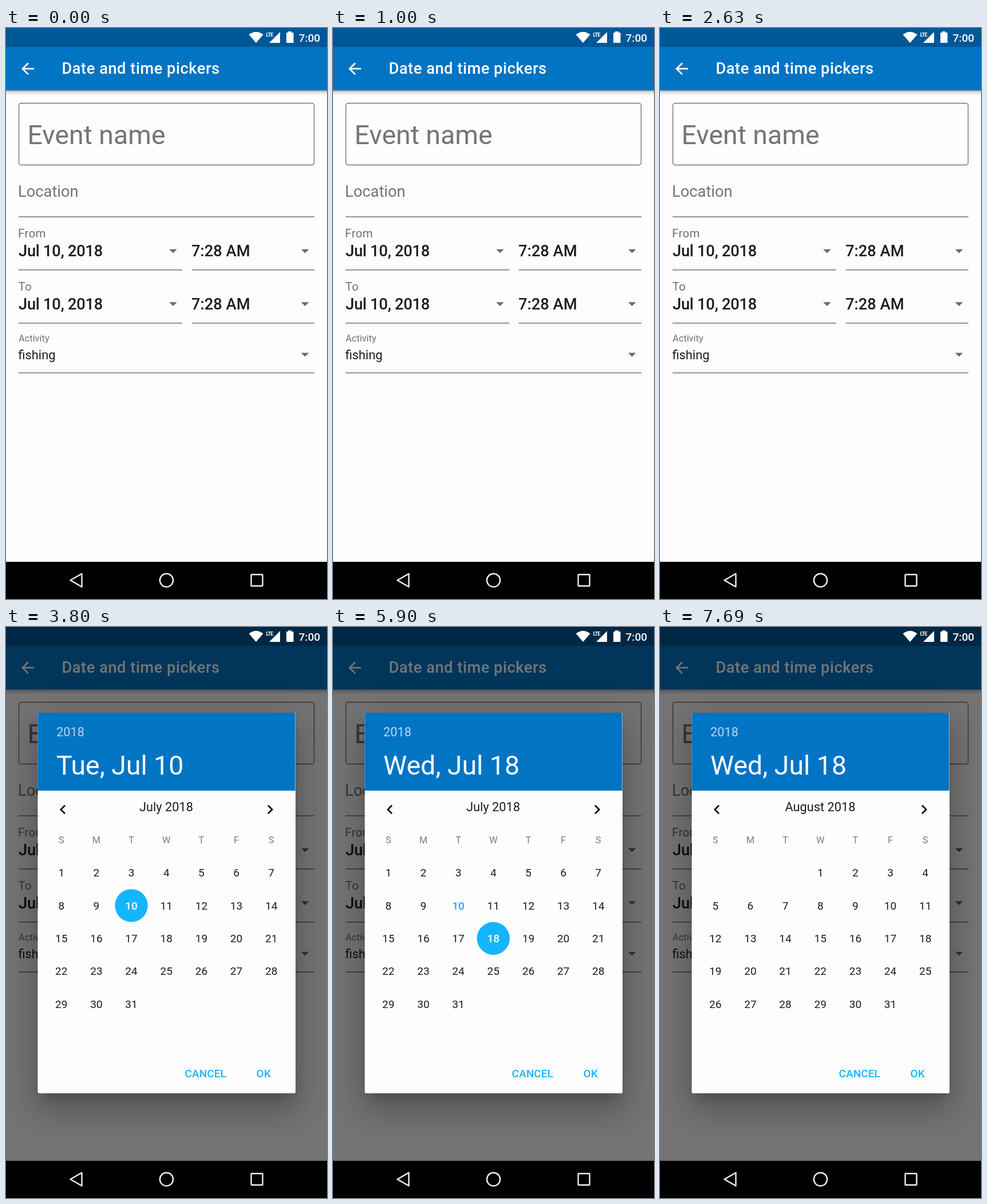
Write an HTML page that moves like this. It is 561 px wide and 998 px high and loops after 8 s.

```html
<!DOCTYPE html>
<html lang="en">
<head>
<meta charset="utf-8">
<title>Date and time pickers</title>
<style>
  html, body { margin: 0; width: 100%; height: 100%; overflow: hidden; background: #000; }
  svg { display: block; width: 561px; height: 998px; }
  text { font-family: Roboto, sans-serif; white-space: pre; }
  .mid { text-anchor: middle; }
  .medium { font-weight: 500; }
  .value { font-size: 27.3px; font-weight: 500; fill: #1c1c20; }
  .label { font-size: 20.5px; letter-spacing: .35px; fill: #717174; }
  .hint { fill: #747476; }
  .lines { fill: none; stroke: #747476; stroke-width: 1.4; }
  .day { font-size: 19.1px; fill: #1d1d1f; }
  .weekday { font-size: 16.4px; fill: #7c7c7e; }
  .accent { fill: #15b5fb; font-weight: 500; }
  .picked { fill: #fff; font-weight: 500; }
  .action { font-size: 19.1px; }
  .panel { position: absolute; left: 55.5px; top: 150px; width: 450px; height: 665px; }
  #shadow {
    width: 450px; height: 665px; border-radius: 3px; background: #fdfdfd;
    box-shadow: 0 15px 20px -9px rgba(0,0,0,.2), 0 33px 52px 4px rgba(0,0,0,.14),
                0 12px 63px 11px rgba(0,0,0,.12);
  }
</style>
</head>
<body>
<svg viewBox="0 0 561 998">
  <defs>
    <linearGradient id="barShadow" x2="0" y2="1">
      <stop offset="0" stop-color="#000" stop-opacity=".34"/>
      <stop offset=".4" stop-color="#000" stop-opacity=".12"/>
      <stop offset="1" stop-color="#000" stop-opacity="0"/>
    </linearGradient>
    <clipPath id="bodyClip"><rect x="55.5" y="286" width="450" height="529"/></clipPath>
  </defs>

  <rect width="561" height="933" fill="#fdfdfd"/>
  <rect y="109" width="561" height="9" fill="url(#barShadow)"/>
  <rect width="561" height="33" fill="#005796"/>
  <rect y="33" width="561" height="76" fill="#0274c4"/>
  <path transform="translate(21.6 54.8) scale(1.365)" fill="#fff"
    d="M20 11H7.83l5.59-5.59L12 4l-8 8 8 8 1.41-1.41L7.83 13H20z"/>
  <text class="medium" x="97.5" y="80" font-size="27.3" letter-spacing=".5" fill="#fff">Date and time pickers</text>

  <g class="lines">
    <rect x="22.5" y="131.5" width="516" height="108" rx="4"/>
    <path d="M22 330H539M22 422.7H308M324.5 422.7H539M22 515.7H308M324.5 515.7H539M22 602.8H539"/>
  </g>
  <text class="hint" x="37.5" y="203" font-size="46.4">Event name</text>
  <text class="hint" x="21" y="295.3" font-size="27.3">Location</text>
  <text class="label" x="21" y="366">From</text>
  <text class="value" x="22" y="399" letter-spacing="-.25">Jul 10, 2018</text>
  <text class="value" x="324" y="399">7:28 AM</text>
  <text class="label" x="21.5" y="459">To</text>
  <text class="value" x="22" y="491.5" letter-spacing="-.25">Jul 10, 2018</text>
  <text class="value" x="324" y="491.5">7:28 AM</text>
  <text class="hint" x="22" y="547.5" font-size="16.4">Activity</text>
  <text x="21.5" y="578.5" font-size="21.8" fill="#1c1c20">fishing</text>
  <g id="carets" fill="#6a6a6d"></g>

  <g id="dialog">
    <rect width="561" height="933" opacity=".54"/>
    <foreignObject width="561" height="933"><div class="panel" id="shadow"></div></foreignObject>
    <rect x="55.5" y="150" width="450" height="665" rx="3" fill="#fdfdfd"/>
    <circle id="ripple" cx="462" cy="319" r="40" opacity=".1" clip-path="url(#bodyClip)"/>
    <path d="M55.5 286V153a3 3 0 0 1 3-3H502.500a3 3 0 0 1 3 3V286z" fill="#0274c4"/>
    <text x="88" y="191" font-size="21.8" fill="#fff" opacity=".72">2018</text>
    <text id="heading" x="88" y="258" font-size="46.4" fill="#fff"></text>
    <g fill="#111">
      <path transform="translate(83 302.600) scale(1.365)" d="M15.41 7.41L14 6l-6 6 6 6 1.41-1.41L10.83 12z"/>
      <path transform="translate(445.200 302.600) scale(1.365)" d="M10 6L8.590 7.410 13.170 12l-4.580 4.590L10 18l6-6z"/>
    </g>
    <text id="month" class="mid" x="280" y="322.300" font-size="21.8" fill="#1d1d1f"></text>
    <g id="weekdays"></g>
    <circle id="disc" r="28.7" fill="#15b5fb"/>
    <g id="days"></g>
    <text class="action accent" x="312.500" y="787">CANCEL</text>
    <text class="action accent" x="437.500" y="787">OK</text>
  </g>

  <g fill="#fff">
    <path d="M424.500 11.500Q437 2 449.500 11.500L437 26z"/>
    <text x="454.500" y="14.500" font-size="9" font-weight="700" letter-spacing="-.9">LTE</text>
    <path d="M460 26L479 7V26z"/>
    <path d="M493 6h6v2h3.500v18h-12.500v-18h3z"/>
    <text class="medium" x="511.500" y="24" font-size="19.1">7:00</text>
  </g>

  <rect y="933" width="561" height="65"/>
  <g fill="none" stroke="#f0f0ee" stroke-width="2.4" stroke-linejoin="round">
    <path d="M112.500 965.300L132.500 953.800V976.800z"/>
    <circle cx="280.500" cy="965.300" r="11.600"/>
    <rect x="428.500" y="955.300" width="20" height="20" rx="1"/>
  </g>

  <circle id="touch" r="15" fill="#fff" fill-opacity=".15" stroke="#dedeee" stroke-width="1.6"/>
</svg>
<script>
const LOOP = 8000, OPEN = 3800, PICK = 5900, NEXT_MONTH = 7570, SETTLED = 7690;
const TAPS = [
  { x: 280.5, y: 389, from: 1510, full: 2010, fade: 2430, end: 2430 },
  { x: 287.5, y: 546, from: 3930, full: 4300, fade: 4810, end: 4810 },
  { x: 469.8, y: 310.500, from: 6360, full: 6760, fade: 6840, end: 7050 }
];
const $ = id => document.getElementById(id);
const colX = col => 96.8 + col * 61.15;
const rowY = row => 429.5 + row * 57.35;

function add(parent, tag, attrs, text = '') {
  const node = document.createElementNS('http://www.w3.org/2000/svg', tag);
  for (const name in attrs) node.setAttribute(name, attrs[name]);
  node.textContent = text;
  return parent.appendChild(node);
}

for (const [x, y] of [[292, 390], [522.6, 390], [292, 482.5], [522.6, 482.5], [522.6, 571]])
  add($('carets'), 'path', { d: `M${x - 6.8} ${y - 3.2}h13.6l-6.8 6.8z` });

[...'SMTWTFS'].forEach((name, col) =>
  add($('weekdays'), 'text', { class: 'mid weekday', x: colX(col), y: 377.5 }, name));

const today = 10;
function drawMonth(name, firstCol, selected) {
  $('month').textContent = name;
  $('days').replaceChildren();
  $('disc').style.display = selected ? '' : 'none';
  for (let day = 1; day <= 31; day++) {
    const cell = firstCol + day - 1;
    const x = colX(cell % 7), y = rowY(Math.floor(cell / 7));
    let style = '';
    if (selected && day === today) style = 'accent';
    if (day === selected) {
      style = 'picked';
      $('disc').setAttribute('cx', x);
      $('disc').setAttribute('cy', y);
    }
    add($('days'), 'text', { class: `mid day ${style}`, x, y: y + 6.7 }, day);
  }
}

function touchOpacity(tap, t) {
  if (t < tap.from || t >= tap.end) return 0;
  if (t < tap.full) return (t - tap.from) / (tap.full - tap.from);
  return t < tap.fade ? 1 : (tap.end - t) / (tap.end - tap.fade);
}

let shown = -1;
function render(t) {
  const stage = [OPEN, PICK, NEXT_MONTH].filter(start => t >= start).length;
  if (stage !== shown) {
    shown = stage;
    $('dialog').style.display = stage ? '' : 'none';
    $('heading').textContent = stage < 2 ? 'Tue, Jul 10' : 'Wed, Jul 18';
    if (stage < 3) drawMonth('July 2018', 0, stage < 2 ? 10 : 18);
    else drawMonth('August 2018', 3, 0);
  }
  $('ripple').style.display = t >= NEXT_MONTH && t < SETTLED ? '' : 'none';

  const tap = TAPS.find(item => t < item.end) || TAPS[2];
  $('touch').setAttribute('cx', tap.x);
  $('touch').setAttribute('cy', tap.y);
  $('touch').setAttribute('opacity', touchOpacity(tap, t));
}

const start = performance.now();
function tick() {
  render((performance.now() - start) % LOOP);
  requestAnimationFrame(tick);
}
tick();
</script>
</body>
</html>
```
